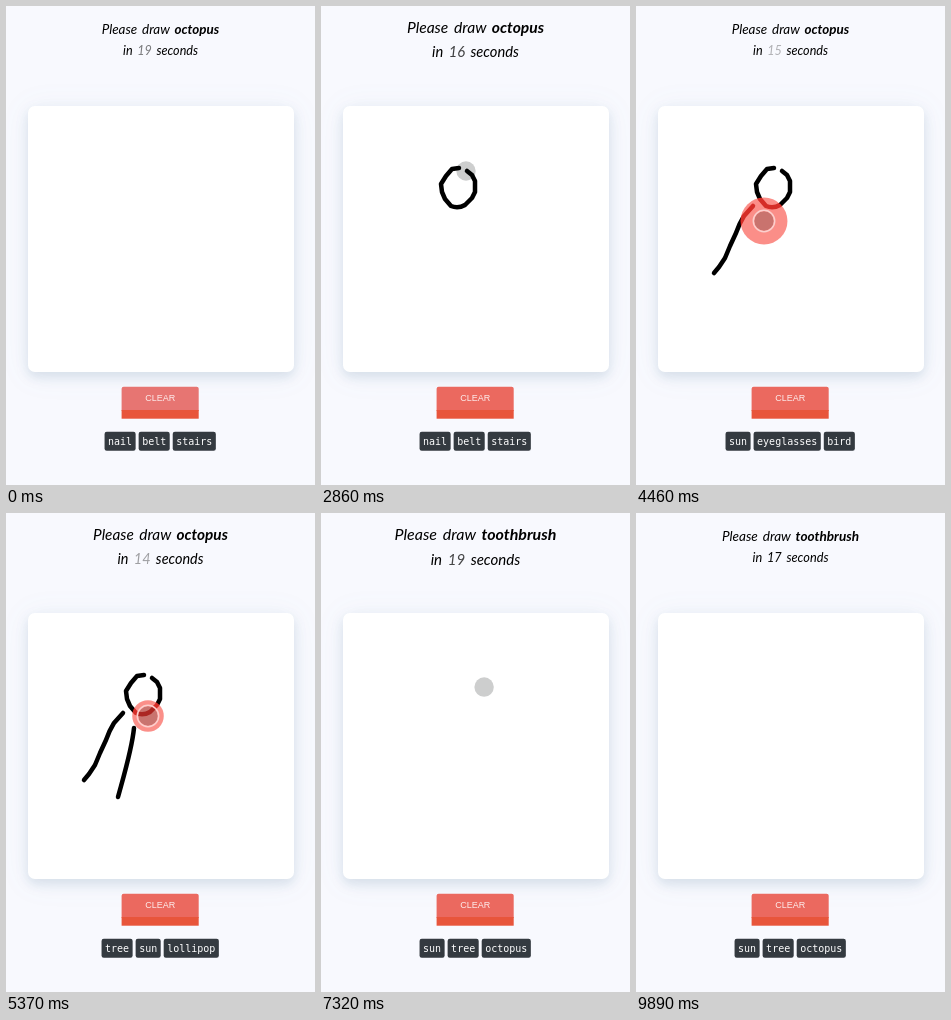
Write an HTML page that moves like this. It is 309 by 479 pixels and loops after 9.95 s.

```html
<!DOCTYPE html>
<html lang="en">
<head>
<meta charset="utf-8">
<title>Please draw</title>
<style>
  html, body { margin: 0; height: 100%; overflow: hidden; background: #f8f9fe; }
  svg { display: block; width: 309px; height: 479px; }
  #title { font: italic 13.4px Lato, sans-serif; word-spacing: 1.7px; text-anchor: middle; }
  #title .small { font-size: 12.6px; }
  #word { font-weight: bold; }
  #clear { font: 9px "Liberation Sans", Arial, sans-serif; fill: #fdeceb; text-anchor: middle; }
  #chips { font: 10px "DejaVu Sans Mono", monospace; fill: #fff; text-anchor: middle; }
  #chips rect { fill: #343a40; }
  #card { fill: #fff; filter: drop-shadow(0 5px 6px rgba(70, 115, 145, .16)) drop-shadow(0 2px 14px rgba(70, 115, 145, .06)); }
  #ink path { fill: none; stroke: #000; stroke-width: 4.5; stroke-linecap: round; stroke-linejoin: round; }
  #glow { fill: #900; mix-blend-mode: screen; }
</style>
</head>
<body>
<svg viewBox="0 0 309 479">
  <rect width="309" height="479" fill="#f8f9fe"/>
  <g id="title">
    <text x="154.5" y="28">Please draw <tspan id="word"></tspan></text>
    <text class="small" x="154.5" y="49">in <tspan id="count"></tspan> seconds</text>
  </g>
  <rect id="card" x="22" y="100" width="266" height="266" rx="7"/>
  <path id="face" d="M115.600 405V382.700q0-2 2-2H190.700q2 0 2 2V405z"/>
  <rect x="115.600" y="404" width="77.100" height="8.700" fill="#e8553b"/>
  <text id="clear" x="154.2" y="395">CLEAR</text>
  <g id="chips"></g>
  <g id="ink"></g>
  <g id="pointer">
    <g id="ripple">
      <circle class="wave" fill="#f04a40" fill-opacity=".62"/>
      <circle class="wave" id="glow"/>
    </g>
    <circle r="9.700" fill="#040a08" fill-opacity=".2"/>
    <circle id="ring" r="10.700" fill="none" stroke="#fbd0ce" stroke-width="1.500"/>
  </g>
</svg>
<script>
const LOOP = 9.95, CLEARED = 6.22, HIDDEN = 8.43;
const $ = id => document.getElementById(id);
const clamp = v => Math.min(1, Math.max(0, v));
const smooth = v => (v = clamp(v), v * v * (3 - 2 * v));
const mix = (a, b, v) => a + (b - a) * v;
const latest = (list, t) => list.filter(item => item[0] <= t).pop();

function add(parent, tag, attrs, text = '') {
  const node = document.createElementNS('http://www.w3.org/2000/svg', tag);
  for (const key in attrs) node.setAttribute(key, attrs[key]);
  node.textContent = text;
  return parent.appendChild(node);
}

// start time, value
const words = [[0, 'octopus'], [6.4, 'toothbrush']];
const counts = [[-.48, 19], [.52, 18], [1.52, 17], [2.52, 16], [3.52, 15], [4.52, 14],
  [5.5, 13], [6.6, 20], [6.95, 19], [7.5, 18], [9.87, 17]];
const guesses = [[0, 'nail belt stairs'], [3.05, 'lollipop eyeglasses baseball'],
  [3.9, 'sun eyeglasses bird'], [5, 'tree sun lollipop'], [7, 'sun tree octopus']];
const presses = [1.12, 3.15, 4.24, 5.3];

// start time, end time, line
const strokes = [
  [1.4, 2.5, 'M146 165L151 169 154 175V186L151 192 144 199Q137 203 130 200L124 193 121 186 120 178 125 170 131 163 138 162'],
  [3.35, 4.05, 'M117 200L108 210Q103 218 100 227L94 240 89 252 83 261 78 267'],
  [4.55, 5.15, 'M128 215C126 236 118 262 112 284'],
  [5.5, 6, 'M142 203C146 230 154 262 160 291']
].map(([start, end, d]) => {
  const path = add($('ink'), 'path', { d });
  return { start, end, path, length: path.getTotalLength() };
});

// pointer stops: time, x, y
const stops = [[.17, 156, 429], [1.1, 147, 163], [2.86, 145, 165], [3.15, 117, 200],
  [4.24, 128, 215], [5.3, 142, 203], [6.52, 161, 171], [7.3, 163, 174], [8.4, 258, 229]];
for (const s of strokes) {
  for (const [time, at] of [[s.start, 0], [s.end, s.length]]) {
    const p = s.path.getPointAtLength(at);
    stops.push([time, p.x, p.y]);
  }
}
stops.sort((a, b) => a[0] - b[0]);

function pointerAt(t) {
  const active = strokes.find(s => t >= s.start && t < s.end);
  if (active) {
    const p = active.path.getPointAtLength(active.length * (t - active.start) / (active.end - active.start));
    return [p.x, p.y];
  }
  const from = latest(stops, t) || stops[0];
  const to = stops[stops.indexOf(from) + 1] || from;
  const v = smooth((t - from[0]) / (to[0] - from[0] || 1));
  return [mix(from[1], to[1], v), mix(from[2], to[2], v)];
}

// two beats per second
function beat(t) {
  const phase = (t + (t > 7.4 ? .1 : 0)) % 1;
  const bump = (a, b) => phase > a && phase < b ? Math.sin(Math.PI * (phase - a) / (b - a)) : 0;
  return 1 + .2 * Math.max(bump(.15, .45), bump(.56, 1));
}

let shown;
function showChips(list) {
  if (list === shown) return;
  shown = list;
  const box = $('chips'), names = list.split(' ');
  const width = name => name.length * 6.02 + 7;
  box.replaceChildren();
  let x = 154.2 - names.reduce((sum, name) => sum + width(name) + 3, -3) / 2;
  for (const name of names) {
    add(box, 'rect', { x, y: 425.7, width: width(name), height: 19, rx: 2.2 });
    add(box, 'text', { x: x + width(name) / 2, y: 439 }, name);
    x += width(name) + 3;
  }
}

function draw(t) {
  $('title').setAttribute('transform', `translate(154.5 34.5) scale(${beat(t)}) translate(-154.5 -34.5)`);
  $('word').textContent = latest(words, t)[1];
  const [since, count] = latest(counts, t);
  $('count').textContent = count;
  $('count').setAttribute('fill-opacity', 1 - .75 * ((Math.max(t, .17) - since) % 1));
  showChips(latest(guesses, t)[1]);

  const hover = smooth((t - 1.5) / .3);
  $('face').setAttribute('fill', `rgb(${mix(231, 235, hover)},${mix(117, 105, hover)},${mix(114, 95, hover)})`);

  for (const s of strokes) {
    const done = clamp((t - s.start) / (s.end - s.start));
    s.path.style.display = done > 0 && t < CLEARED ? '' : 'none';
    s.path.style.strokeDasharray = `${s.length * done} 999`;
  }

  const [x, y] = pointerAt(t);
  $('pointer').style.display = t >= .17 && t < HIDDEN ? '' : 'none';
  $('pointer').setAttribute('transform', `translate(${x} ${y})`);
  const age = t - presses.findLast(p => p <= t);
  const pressed = age < .4;
  $('ripple').style.display = $('ring').style.display = pressed ? '' : 'none';
  if (pressed) {
    const radius = 9.5 + 15 * (1 - (1 - clamp(age / .3)) ** 2);
    const opacity = 1 - clamp((age - .25) / .15);
    for (const wave of document.querySelectorAll('.wave')) {
      wave.setAttribute('r', radius);
      wave.style.opacity = opacity;
    }
    $('ring').style.opacity = opacity;
  }
}

const begin = performance.now();
function tick() {
  draw((performance.now() - begin) / 1000 % LOOP);
  requestAnimationFrame(tick);
}
tick();
</script>
</body>
</html>
```
